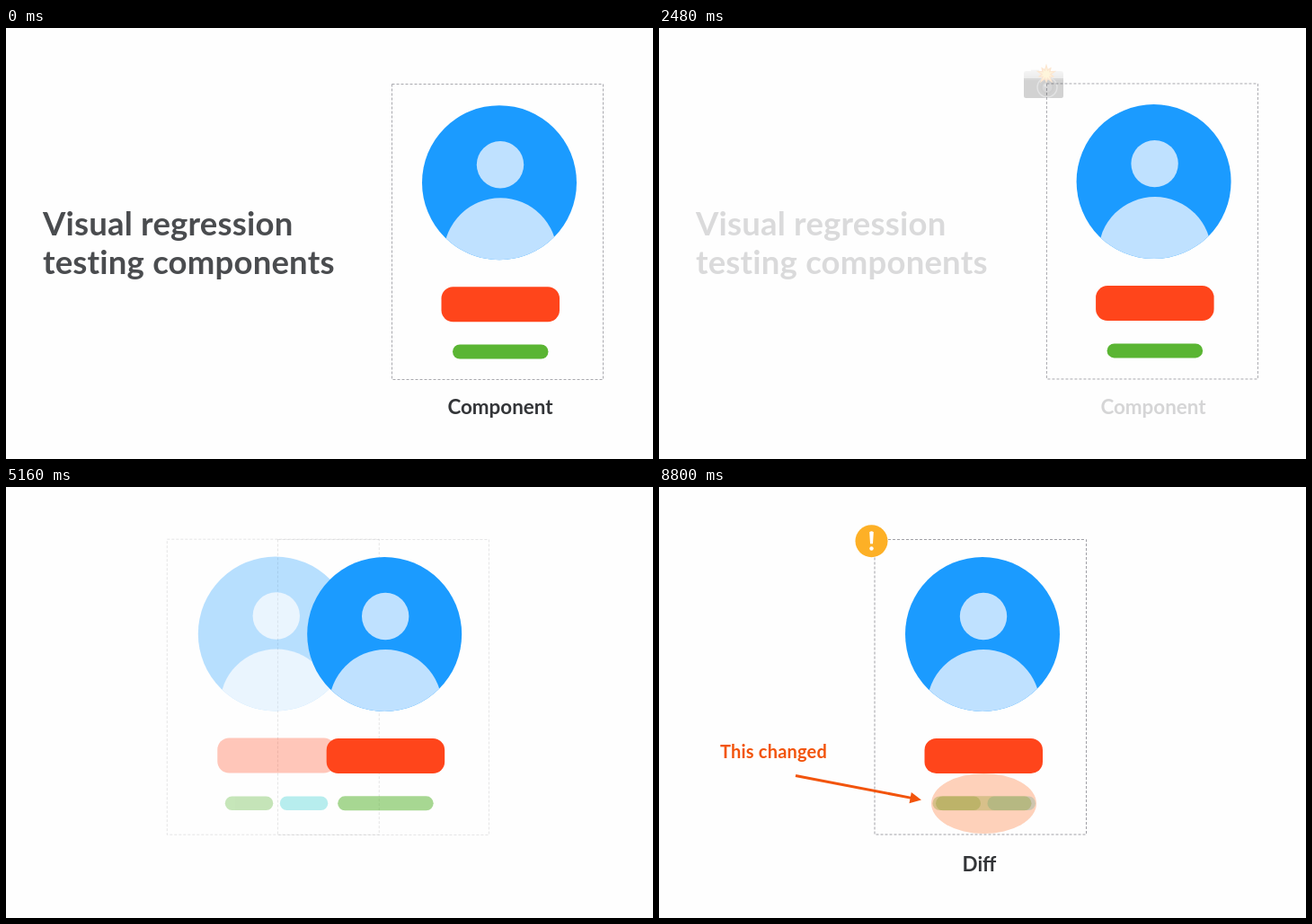
These frames come from a looping animation (720x480 px, 8.88 s). An HTML page:

```html
<!DOCTYPE html>
<html lang="en">
<head>
<meta charset="utf-8">
<title>Visual regression testing components</title>
<style>
  html, body { margin: 0; width: 100%; height: 100%; overflow: hidden; background: #fefefe; }
  svg { display: block; width: 720px; height: 480px; }
  text { font-family: Lato, "Open Sans", sans-serif; font-weight: 700; }
  .title { font-size: 36.5px; letter-spacing: .2px; fill: #4a4c4f; }
  .label { font-size: 22.4px; text-anchor: middle; fill: #333538; }
  .note { font-size: 20px; letter-spacing: .2px; fill: #f2540c; }
  .box { fill: none; stroke: #a9a9ae; stroke-dasharray: 3 2; }
  .gray { fill: none; stroke: #97979b; stroke-width: 2.4; }
  .tip { fill: #97979b; }
</style>
</head>
<body>
<svg viewBox="0 0 720 480">
  <defs>
    <clipPath id="round"><circle r="86"/></clipPath>
    <linearGradient id="metal" x2="0" y2="1">
      <stop stop-color="#d4d4d2"/><stop offset="1" stop-color="#9b9c9c"/>
    </linearGradient>
    <g id="face">
      <circle r="86" fill="#1b9bff"/>
      <g fill="#bfe1ff" clip-path="url(#round)">
        <circle cx="1" cy="-20" r="26.2"/>
        <circle cx="1.2" cy="80" r="63"/>
      </g>
      <rect x="-64.5" y="116" width="131.5" height="39" rx="13" fill="#ff451b"/>
    </g>
  </defs>

  <g id="title" class="title">
    <text x="41" y="231">Visual regression</text>
    <text x="41" y="273.5">testing components</text>
  </g>
  <text id="component" class="label" x="550" y="430">Component</text>

  <rect id="oldBox" class="box" width="236" height="329"/>
  <rect id="newBox" class="box" width="235" height="329"/>
  <rect id="diffBox" class="box" x="240" y="58.5" width="235.5" height="328.5" style="stroke:#a0a0a6"/>

  <g id="oldCard">
    <use id="oldFace" href="#face"/>
    <g id="oldPills">
      <rect x="-56" y="181" width="53.5" height="15.5" rx="7.7" fill="#5ab533"/>
      <rect x="5" y="181" width="53.5" height="15.5" rx="7.7" fill="#30cfd0"/>
    </g>
  </g>
  <g id="newCard">
    <use id="newFace" href="#face"/>
    <rect id="newPill" x="-52" y="180.3" width="106.5" height="16" rx="8" fill="#5ab533"/>
  </g>

  <g id="names" class="label">
    <text x="160" y="428">Old</text>
    <text x="565" y="429">New</text>
  </g>

  <g id="swap">
    <g id="there">
      <path id="thereLine" class="gray"/>
      <path id="thereTip" class="tip" d="M0 0l-10.500-5v10z"/>
    </g>
    <path id="back" class="gray" pathLength="100" d="M404 216C410 216 413.300 219 413.300 225.700S410 235.500 403 235.500H315"/>
    <path id="backTip" class="tip" d="M305.500 235.500l10.500-5v10z"/>
  </g>

  <g id="camera">
    <path d="M408 48h6v-1.500h9v1.500h24q3 0 3 3v7h-44v-8q0-2 2-2z" fill="url(#metal)"/>
    <path d="M406 56h44v19.500q0 2.500-2.500 2.500h-39q-2.500 0-2.500-2.500z" fill="#222324"/>
    <path d="M406 57h44" stroke="#55575a" stroke-width="1"/>
    <circle cx="432" cy="66" r="11" fill="#19191b" stroke="#77797c" stroke-width="1.4"/>
    <circle cx="432" cy="66" r="6.500" fill="#37383c" stroke="#0b0b0c" stroke-width="2"/>
    <circle cx="430" cy="64" r="1.800" fill="#85868c"/>
    <path id="burstOuter" fill="#f58a1f"/>
    <path id="burstInner" fill="#ffd452"/>
  </g>

  <text id="diff" class="label" x="356.500" y="428">Diff</text>
  <g id="alert">
    <circle r="18" fill="#fdb026"/>
    <path d="M-2.300-10q2.300-1.800 4.600 0L1.500 3h-3z" fill="#fff"/>
    <circle cy="8.300" r="2.200" fill="#fff"/>
  </g>
  <ellipse id="spot" cx="361.500" cy="352.500" rx="58.500" ry="33.500" fill="#fa5500"/>
  <path id="ring" pathLength="100" fill="none" stroke="#fa5500" stroke-opacity=".4"
        d="M402.100 328.400A58.500 33.500 0 0 1 320.900 376.600A58.500 33.500 0 0 1 402.100 328.400"/>
  <text id="note" class="note" x="68" y="301.500">This changed</text>
  <g id="pointer" transform="translate(152 321.500) rotate(10.900)">
    <path id="pointerLine" stroke="#f2540c" stroke-width="3"/>
    <path id="pointerTip" fill="#f2540c" d="M0 0l-12.500-6.200v12.400z"/>
  </g>
</svg>
<script>
  const LOOP = 8880;
  const el = {};
  document.querySelectorAll('svg [id]').forEach(n => el[n.id] = n);

  const ramp = (t, a, b) => Math.min(1, Math.max(0, (t - a) / (b - a)));
  const mix = (a, b, p) => a + (b - a) * p;
  const ease = t => t < .5 ? 4 * t ** 3 : 1 - (2 - 2 * t) ** 3 / 2;
  const smooth = t => t * t * (3 - 2 * t);
  const set = (n, k, v) => n.setAttribute(k, v);
  const show = (n, o) => {
    n.style.display = o > 0 ? '' : 'none';
    n.style.opacity = o;
  };
  const place = (n, x, y, s = 1) => set(n, 'transform', `translate(${x} ${y}) scale(${s})`);
  const trace = (n, p) => {
    show(n, p > 0 ? 1 : 0);
    set(n, 'stroke-dasharray', p < 1 ? `${p * 100} 200` : 'none');
  };

  function star(x, y, points, outer, inner) {
    let d = '';
    for (let i = 0; i < points * 2; i++) {
      const r = i % 2 ? inner : outer * (i % 4 ? .82 : 1);
      const a = i * Math.PI / points - Math.PI / 2;
      d += `${i ? 'L' : 'M'}${x + r * Math.cos(a)} ${y + r * Math.sin(a)}`;
    }
    return d + 'z';
  }
  set(el.burstOuter, 'd', star(431, 51.5, 10, 12, 6));
  set(el.burstInner, 'd', star(431, 51.5, 10, 8, 3.5));

  function draw(t) {
    // Two slide moves: single component to comparison, then comparison to diff.
    const t1 = ramp(t, 2224, 3024), t2 = ramp(t, 4700, 5500);
    const p1 = ease(t1), p2 = ease(t2);
    const out1 = 1 - ramp(t1, .08, .38), out2 = 1 - ramp(t2, .08, .38);
    const in1 = smooth(ramp(t1, .5, 1)), in2 = smooth(ramp(t2, .6, 1));

    show(el.title, out1);
    show(el.component, out1);
    show(el.names, in1 * out2);

    const snap = smooth(ramp(t, 1100, 1480));
    show(el.camera, snap * out1);
    const size = mix(.6, 1, snap);
    place(el.camera, 428 * (1 - size), 60 * (1 - size), size);

    // Shutter flash dims the shapes, then lets them back.
    const flash = 1 - .73 * (smooth(ramp(t, 1560, 1840)) - smooth(ramp(t, 1860, 2160)));
    show(el.newFace, flash);
    show(el.newPill, flash * mix(1, .32, p2));
    place(el.newCard, mix(mix(549, 561, p1), 360, p2), mix(172.2, 164, p1));
    place(el.newBox, mix(mix(429.5, 444, p1), 240.5, p2), mix(62.5, 58.5, p1));
    show(el.newBox, 1 - p2);

    place(el.oldCard, mix(161, 360.5, p2), mix(163.2, 163.6, p2));
    show(el.oldFace, in1 * (1 - p2));
    show(el.oldPills, in1 * (1 - .68 * Math.min(1, p2 / .72)));
    place(el.oldBox, mix(40.5, 240, p2), mix(57.5, 58.5, p2));
    show(el.oldBox, in1 * (1 - p2));
    show(el.diffBox, in2);
    show(el.diff, in2);

    const go = smooth(ramp(t, 3040, 3360)), ret = smooth(ramp(t, 3320, 3680));
    const tip = mix(316, 400.5, go);
    show(el.swap, out2);
    show(el.there, ramp(t, 3040, 3100));
    set(el.thereLine, 'd', `M306 216H${tip - 9}`);
    place(el.thereTip, tip, 216);
    trace(el.back, ret);
    show(el.backTip, ramp(ret, .9, 1));

    const pop = smooth(ramp(t, 5500, 5900));
    show(el.alert, pop);
    place(el.alert, 236.5, 60.2, mix(.5, 1, pop));

    const fill = ramp(t, 6500, 6760);
    trace(el.ring, ramp(t, 6080, 6670));
    if (fill > 0) show(el.ring, 1 - fill);
    show(el.spot, .27 * fill);

    show(el.note, ramp(t, 6640, 6880));
    const len = mix(14, 142.5, smooth(ramp(t, 6800, 7320)));
    show(el.pointer, ramp(t, 6800, 6860));
    set(el.pointerLine, 'd', `M0 0H${len - 11}`);
    place(el.pointerTip, len, 0);
  }

  const start = performance.now();
  function tick() {
    draw((performance.now() - start) % LOOP);
    requestAnimationFrame(tick);
  }
  tick();
</script>
</body>
</html>
```
